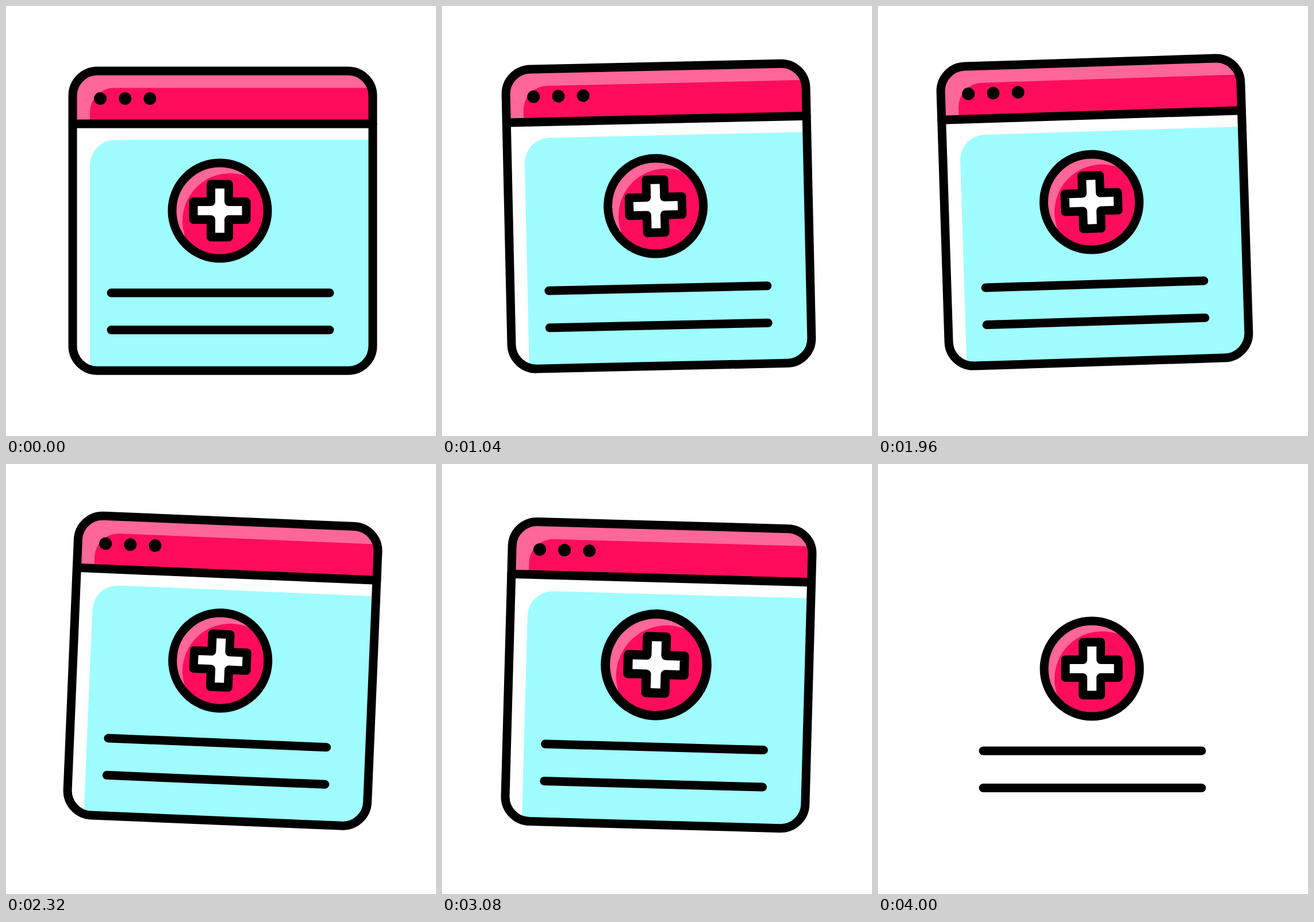
These frames come from a looping animation (748x748 px, 4040 ms). An HTML page:

```html
<!DOCTYPE html>
<html lang="en">
<head>
<meta charset="utf-8">
<title>Medical page</title>
<style>
  html, body { margin: 0; width: 100%; height: 100%; overflow: hidden; background: #fff; }
  svg { display: block; width: 100vw; height: 100vh; }
  .line { fill: none; stroke: #000; stroke-width: 15; stroke-linecap: round; stroke-linejoin: round; }
  .light { fill: #ff6699; }
  .dark { fill: #ff0d5c; }
  .sky { fill: #9ffdff; }
</style>
</head>
<body>
<svg viewBox="0 0 748 748">
  <defs>
    <clipPath id="paneClip"><rect x="116" y="113" width="522" height="521.3" rx="43"/></clipPath>
    <clipPath id="badgeClip"><circle cx="372" cy="356" r="83"/></clipPath>
  </defs>
  <g id="card">
    <g id="pane">
      <g clip-path="url(#paneClip)">
        <rect x="108" y="105" width="538" height="537" fill="#fff"/>
        <rect class="light" x="108" y="105" width="538" height="100"/>
        <path class="dark" d="M146 205V185A42 42 0 0 1 188 142.5H646V205Z"/>
        <path class="sky" d="M146 642V277A44 44 0 0 1 190 233H646V642Z"/>
      </g>
      <path class="line" d="M116 205H638"/>
      <rect class="line" x="116" y="113" width="522" height="521.3" rx="43"/>
      <circle cx="164" cy="161" r="11"/>
      <circle cx="207.2" cy="161" r="11"/>
      <circle cx="250.4" cy="161" r="11"/>
    </g>
    <g id="badge">
      <g clip-path="url(#badgeClip)">
        <circle class="light" cx="372" cy="356" r="83"/>
        <circle class="dark" cx="390" cy="374" r="83"/>
      </g>
      <circle class="line" cx="372" cy="356" r="83"/>
      <path class="line" style="fill:#fff"
        d="M356.5 310h31v30.5h30.5v31h-30.5v30.5h-31v-30.5h-30.5v-31h30.5z"/>
    </g>
    <path class="line" d="M183 499H563M183 563.5H563"/>
  </g>
</svg>
<script>
  const LOOP = 4040, STEP = 40, PANE_END = 4000;

  // Each key is [time in ms, value]; values ease in and out between keys.
  const lift = [[0, 0], [2000, -15], [4000, 0]];
  const swing = [[600, 0], [1000, -1.5], [1400, 6], [1800, -5], [2200, 4],
                 [2600, -3.4], [3090, 1.6], [3540, 0]];
  const pulse = [[2400, 1], [2920, 1.083], [3440, 1]];

  const [card, pane, badge] = ['card', 'pane', 'badge'].map(id => document.getElementById(id));

  function valueAt(keys, t) {
    if (t <= keys[0][0]) return keys[0][1];
    for (let i = 1; i < keys.length; i++) {
      const [t0, a] = keys[i - 1], [t1, b] = keys[i];
      if (t <= t1) {
        const u = (t - t0) / (t1 - t0);
        return a + (b - a) * u * u * (3 - 2 * u);
      }
    }
    return keys[keys.length - 1][1];
  }

  function draw(time) {
    const t = Math.floor(time % LOOP / STEP) * STEP;
    card.setAttribute('transform',
      `translate(0 ${valueAt(lift, t)}) rotate(${valueAt(swing, t)} 374 374)`);
    badge.setAttribute('transform',
      `translate(372 356) scale(${valueAt(pulse, t)}) translate(-372 -356)`);
    pane.setAttribute('visibility', t < PANE_END ? 'visible' : 'hidden');
  }

  const start = performance.now();
  function tick() {
    draw(performance.now() - start);
    requestAnimationFrame(tick);
  }
  tick();
</script>
</body>
</html>
```
